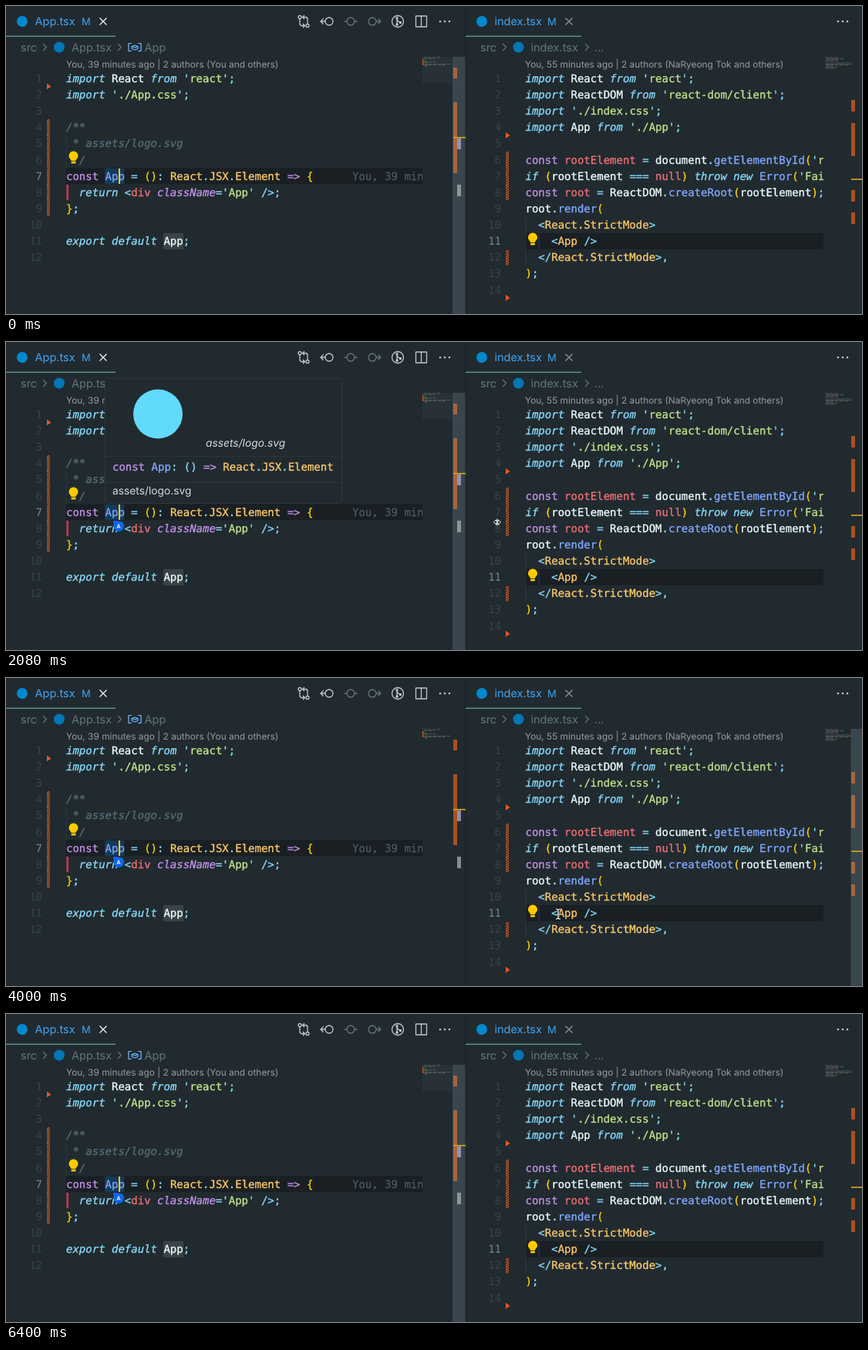
An HTML page that plays this animation: 1110x400 px, repeating every 6.48 s.

```html
<!DOCTYPE html>
<html lang="en">
<head>
<meta charset="utf-8">
<title>Editor hover preview</title>
<style>
html, body { margin: 0; width: 100%; height: 100%; overflow: hidden; background: #212a2f; }
svg { display: block; width: 100%; height: 100%; }
text { white-space: pre; text-rendering: geometricPrecision; }
.code { font: 14px "DejaVu Sans Mono", "Noto Sans Mono", monospace; stroke-width: .3px; }
.ui { font-family: Inter, "Open Sans", sans-serif; }
</style>
</head>
<body>
<svg id="stage" viewBox="0 0 1110 400"></svg>
<script>
const LOOP = 6480, STEP = 80, LINE = 21.12;
const BG = '#212a2f', ACTIVE_LINE = '#191f23', BLUE = '#42a5f5', DIM = '#607781';
const ORANGE = '#a9511b', HATCH = '#e2591d', ATOM = '#61dafb';

// Token styles: [colour, italic]
const STYLE = {
  k: ['#89ddff', 1], p: ['#89ddff', 0], w: ['#eeffff', 0], g: ['#c3e88d', 0], v: ['#c792ea', 0],
  a: ['#c792ea', 1], b: ['#82aaff', 0], y: ['#ffcb6b', 0], r: ['#f07178', 0], o: ['#ffd700', 0],
  c: ['#546e7a', 1], d: ['#4d5a62', 0]
};
const JSX_TYPE = '^yReact^p.^yJSX^p.^yElement';
const SIGNATURE = `^vconst ^bApp^p: () ^v=> ${JSX_TYPE}`;
const ALIAS = '^w(alias) ' + SIGNATURE;
const str = s => `^p'^g${s}^p'`;

const leftLines = [
  `^kimport ^wReact ^kfrom ${str('react')};`,
  `^kimport ${str('./App.css')};`,
  '',
  '^c/**',
  '^c * assets/logo.svg',
  '^c */',
  `^vconst ^bApp ^p= ^o()^p: ${JSX_TYPE} ^v=> ^o{^d      You, 39 minutes ago`,
  `^k  return ^p<^rdiv ^aclassName^p=${str('App')} />;`,
  '^o}^p;',
  '',
  '^kexport default ^wApp^p;',
  ''
];
const rightLines = [
  `^kimport ^wReact ^kfrom ${str('react')};`,
  `^kimport ^wReactDOM ^kfrom ${str('react-dom/client')};`,
  `^kimport ${str('./index.css')};`,
  `^kimport ^wApp ^kfrom ${str('./App')};`,
  '',
  "^vconst ^rrootElement ^p= ^wdocument^p.^bgetElementById^o(^p'^gr",
  "^kif ^o(^wrootElement ^p=== ^rnull^o) ^kthrow new ^bError^o(^p'^gFai",
  '^vconst ^rroot ^p= ^wReactDOM^p.^bcreateRoot^o(^wrootElement^o)^p;',
  '^wroot^p.^brender^o(',
  '^p  <^yReact.StrictMode^p>',
  '^p    <^yApp ^p/>',
  '^p  </^yReact.StrictMode^p>,',
  '^o)^p;',
  ''
];

const esc = s => s.replace(/&/g, '&amp;').replace(/</g, '&lt;');
const rect = (x, y, w, h, fill, extra = '') => `<rect x="${x}" y="${y}" width="${w}" height="${h}" fill="${fill}" ${extra}/>`;
const path = (d, stroke, width = 1.3, fill = 'none') =>
  `<path d="${d}" stroke="${stroke}" stroke-width="${width}" fill="${fill}" stroke-linejoin="round"/>`;
const dot = (x, y, r, fill) => `<circle cx="${x}" cy="${y}" r="${r}" fill="${fill}"/>`;
const ring = (x, y, r, stroke) => `<circle cx="${x}" cy="${y}" r="${r}" fill="none" stroke="${stroke}" stroke-width="1.3"/>`;
const label = (x, y, s, fill, size, extra = '') =>
  `<text class="ui" x="${x}" y="${y}" fill="${fill}" font-size="${size}" ${extra}>${esc(s)}</text>`;

function code(x, y, source) {
  const spans = source.split('^').slice(1).map(token => {
    const [color, italic] = STYLE[token[0]];
    return `<tspan fill="${color}" stroke="${color}"${italic ? ' font-style="italic"' : ''}>${esc(token.slice(1))}</tspan>`;
  });
  return `<text class="code" x="${x}" y="${y}">${spans.join('')}</text>`;
}

const baseline = i => 99 + i * LINE;
const codeBlock = (x, lines) => lines.map((line, i) => code(x, baseline(i), line)).join('');
const lineNumbers = (x, count, active) => Array.from({ length: count }, (_, i) =>
  `<text class="code" x="${x}" y="${baseline(i)}" text-anchor="end" fill="${i + 1 === active ? '#718891' : '#36444b'}">${i + 1}</text>`).join('');

const chevron = x => path(`M${x} 49l4.5 4.5l-4.5 4.5`, DIM, 1.2);
const cross = (x, color) => path(`M${x - 4.5} 15.5l9 9m0 -9l-9 9`, color, 1.3);
const dots = x => [-6, 0, 6].map(d => dot(x + d, 20, 1.3, '#c0c8cc')).join('');
const hatch = (x, y, h) => rect(x, y, 4, h, 'url(#hatch)');
const marker = (x, y) => `<path d="M${x} ${y - 4}l5.5 4l-5.5 4z" fill="${HATCH}"/>`;
const marks = (x, spans) => spans.map(([y, h]) => rect(x, y, 5, h, ORANGE)).join('');

function bulb(x, y) {
  return `<path d="M${x - 3} ${y + 4}c0 -2 -3 -3 -3 -6.5a6 6 0 0 1 12 0c0 3.5 -3 4.5 -3 6.5z" fill="#ffcc00"/>` +
    rect(x - 3, y + 4.8, 6, 2.6, '#ffcc00', 'rx="1"');
}

function tab(x, name, end, closeColor) {
  return dot(x + 21, 20, 7, '#0288d1') + label(x + 37.5, 25, name, BLUE, 14.5) +
    label(end - 44, 25, 'M', BLUE, 13) + cross(end - 16, closeColor) + rect(x, 38.7, end - x, 1.1, '#6fb3ad');
}

function toolbar() {
  const on = '#c0c8cc', off = '#69757c';
  return ring(381, 14.5, 2, on) + ring(391, 25.5, 2, on) +
    path('M381 17V23q0 2.5 2.5 2.5h4m-2.5 -2.5l2.5 2.5l-2.5 2.5M391 23V17q0 -2.5 -2.5 -2.5h-4m2.5 -2.5l-2.5 2.5l2.5 2.5', on) +
    ring(419, 20, 5, on) + path('M414 20h-6m3.5 -3.5l-3.5 3.5l3.5 3.5', on) +
    ring(447, 20, 5, off) + path('M438.5 20h3.5M452 20h3.5', off) +
    ring(475, 20, 5, off) + path('M480 20h6m-3.5 -3.5l3.5 3.5l-3.5 3.5', off) +
    ring(508, 20, 7.5, on) + path('M507 14v12M507 18l4 4', on) +
    dot(507, 16, 1.7, on) + dot(507, 24, 1.7, on) + dot(511.5, 21.5, 1.7, on) +
    path('M531.5 13h14v14h-14zM538.5 13v14', on) + dots(569);
}

function minimap(x, rows) {
  const colors = ['#5d8793', '#66764f', '#75609a', '#8c7a50'];
  return rows.map((width, i) => Array.from({ length: Math.ceil(width / 6) }, (_, j) =>
    rect(x + j * 6 + (i % 3), 66.5 + i * 1.4, Math.min(5, width - j * 6), .8, colors[(i + j) % 4], 'opacity=".75"')).join('')).join('');
}

// Hover card; an import line makes the signature part taller
function card(id, x, y, width, signature, importLine) {
  const extra = importLine ? 21 : 0, lift = importLine ? 2 : 0;
  const sep = dy => rect(x, y + dy, width, 1, '#2b363c');
  return `<g id="${id}">` +
    rect(x + .5, y + .5, width, 162 + extra, BG, 'stroke="#2c373d" rx="2"') +
    dot(x + 69, y + 46.5, 32, ATOM) +
    label(x + 131, y + 89 - lift, 'assets/logo.svg', '#d3dbde', 13.8, 'font-style="italic"') +
    sep(101 - lift) + code(x + 10, y + 120 - lift / 2, signature) +
    (importLine ? code(x + 10, y + 140, importLine) : '') +
    sep(135 + extra - lift) + label(x + 10, y + 151 + extra, 'assets/logo.svg', '#d3dbde', 13.8) + '</g>';
}

const slider = (x, w) => rect(x, 66, w, 334, '#9fb6c0', 'opacity=".2"');
const beam = 'M-3 -6q3 0 3 2q0 -2 3 -2M0 -4v9M-3 7q3 0 3 -2q0 2 3 2M-2 1h4';

document.getElementById('stage').innerHTML = `
<defs>
  <pattern id="hatch" width="4" height="3.2" patternUnits="userSpaceOnUse">
    <path d="M-1 3.6L5 -.4M-1 6.8L5 2.8" stroke="${HATCH}" stroke-width="1.4"/>
  </pattern>
  <clipPath id="leftClip">${rect(76, 60, 464, 340, '#000')}</clipPath>
  <clipPath id="rightClip">${rect(671, 60, 389, 340, '#000')}</clipPath>
</defs>` +
  rect(0, 0, 1110, 400, BG) + rect(595.5, 0, 1, 400, '#1a2126') +

  tab(0, 'App.tsx', 142, '#eef4f6') + toolbar() +
  label(19, 59, 'src', DIM, 14.5) + chevron(48) + dot(69, 53.5, 7, '#0277b5') +
  label(85, 59, 'App.tsx', DIM, 14.5) + chevron(145) +
  path('M163 48.5h-4v10h4M171 48.5h4v10h-4', '#75beff', 1.2) +
  path('M163 52.5l4 -1.5l4 1.5v3l-4 1.5l-4 -1.5zM163 52.5l4 1.5l4 -1.5', '#75beff', 1.1) +
  label(179.5, 59, 'App', DIM, 14.5) +
  label(78, 79.5, 'You, 39 minutes ago | 2 authors (You and others)', '#929da3', 11.9) +
  rect(78, 210.3, 462, 21, ACTIVE_LINE) + rect(128, 211, 25.5, 20, '#15395c') + rect(204, 295, 26, 21, '#3a4348') +
  rect(128, 211, 25.5, 20, '#1c4b75', 'id="leftHover"') +
  rect(78, 168, .8, 42, '#2d383f') + rect(78.5, 232, 2.5, 20, '#d8324d') +
  lineNumbers(47, 12, 7) + `<g clip-path="url(#leftClip)">${codeBlock(78, leftLines)}</g>` +
  rect(81, 190, 13, 17, BG) + bulb(87.5, 197) +
  marker(53, 104.5) + hatch(53, 147, 126) +
  marks(580, [[80, 14], [125, 92]]) + rect(585, 172, 5, 14, '#9288ab') + rect(585, 232, 5, 15, '#858e92') +
  `<g id="leftSlider">${rect(540, 66, 39, 34, '#273137')}${slider(579, 16.5)}</g>` +
  minimap(541, [22, 14, 0, 4, 16, 4, 36, 28, 4, 0]) + rect(540, 69, 1.2, 8, HATCH) +
  rect(580, 170, 16, 1.6, '#d6a91c') +

  tab(596, 'index.tsx', 746, '#8b969c') + dots(1085) +
  label(615, 59, 'src', DIM, 14.5) + chevron(644) + dot(664.5, 53.5, 7, '#0277b5') +
  label(680.5, 59, 'index.tsx', DIM, 14.5) + chevron(751) + label(763, 59, '...', DIM, 14.5) +
  label(673, 79.5, 'You, 55 minutes ago | 2 authors (NaRyeong Tok and others)', '#929da3', 11.9) +
  rect(673, 295, 387, 21, ACTIVE_LINE) + rect(673.5, 274, .8, 63, '#344047') + rect(690.5, 295, .8, 21, '#3c484e') +
  rect(0, 0, 26, 20, '#27353d', 'id="rightHover"') +
  lineNumbers(642, 14, 11) + `<g clip-path="url(#rightClip)">${codeBlock(673.5, rightLines)}</g>` +
  bulb(683, 303) +
  marker(648, 168) + marker(648, 379) + hatch(648, 189, 63) + hatch(648, 317, 20) +
  minimap(1062, [18, 24, 15, 18, 0, 32, 34, 30, 8, 16, 12]) +
  marks(1096, [[122, 15], [152, 43], [239, 15], [268, 15]]) +
  `<g id="rightSlider">${slider(1095.5, 14.5)}</g>` + rect(1096, 224.3, 14, 1.6, '#d6a91c') +

  card('leftCard', 128, 47, 307, SIGNATURE) +
  card('importCard', 719, 169, 374, ALIAS, '^kimport ^wApp') +
  card('tagCard', 715, 111.5, 374, ALIAS, '^kimport ^wApp') +
  rect(146, 211, 2, 20, '#ffcc00', 'id="caret"') +
  `<g id="badge"><path d="M139 232l8 .5a6.8 6.8 0 1 1 -7.5 7.5z" fill="#0a66f0"/>` +
  label(146, 242, 'A', '#fff', 7.5, 'text-anchor="middle" font-weight="600"') + '</g>' +
  `<g id="arrow">${path('M0 0V12.5l3 -2.7l2 4.4l2.2 -1l-2 -4.2h4z', '#fff', 1, '#111')}</g>` +
  `<g id="resize">${path('M-4.5 0l3.2 -3.2v2.2h2.6v-2.2l3.2 3.2l-3.2 3.2v-2.2h-2.6v2.2zM0 -4.5v9', '#fff', 1, '#111')}</g>` +
  `<g id="beam">${path(beam, '#111', 2.6)}${path(beam, '#fff', 1.2)}</g>`;

const el = id => document.getElementById(id);
const show = (id, visible) => el(id).setAttribute('visibility', visible ? 'visible' : 'hidden');
const place = (id, x, y) => el(id).setAttribute('transform', `translate(${x.toFixed(2)} ${y.toFixed(2)})`);

// Pointer stops: [time, x, y]
const stops = [
  [0, -14, 388], [160, -14, 388], [660, 141, 230], [1840, 141, 230], [2080, 637, 234],
  [2240, 650, 234], [2600, 750, 159], [3560, 750, 159], [3840, 716, 306], [4400, 716, 306],
  [4640, 719, 306], [5760, 719, 306], [6240, 330, 414], [LOOP, 330, 414]
];

function pointerAt(t) {
  const i = stops.findIndex(stop => stop[0] > t);
  const [t0, x0, y0] = stops[i - 1], [t1, x1, y1] = stops[i];
  const u = (t - t0) / (t1 - t0), e = u * u * (3 - 2 * u);
  return [x0 + (x1 - x0) * e, y0 + (y1 - y0) * e];
}

function render(t) {
  const within = (from, to) => t >= from && t < to;
  const [x, y] = pointerAt(t);
  const kind = t < 2000 ? 'arrow' : t < 2320 ? 'resize' : 'beam';
  for (const id of ['arrow', 'resize', 'beam']) {
    show(id, id === kind);
    place(id, x, y);
  }
  const onImport = within(2720, 3680), onTag = within(4400, 5840);
  show('leftCard', within(1040, 2160));
  show('leftHover', within(720, 1920));
  show('importCard', onImport);
  show('tagCard', onTag);
  show('rightHover', onImport || onTag);
  place('rightHover', onImport ? 732 : 715, onImport ? 148 : 295.5);
  show('rightSlider', within(2240, 6000));
  show('leftSlider', !within(2240, 6000));
  show('badge', t >= 560);
  show('caret', t % 1000 < 500);
}

function tick(now) {
  render(Math.floor(now % LOOP / STEP) * STEP);
  requestAnimationFrame(tick);
}
render(0);
requestAnimationFrame(tick);
</script>
</body>
</html>
```
